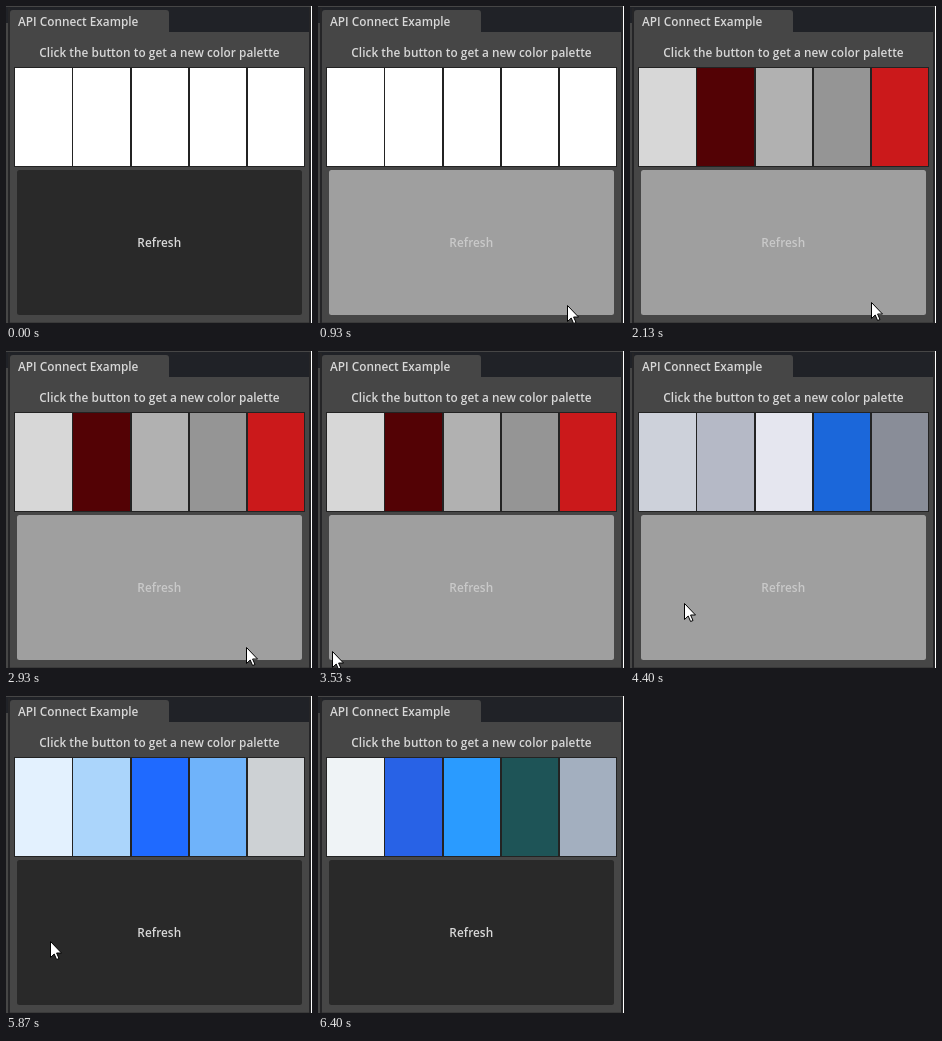
Write an HTML page that moves like this. It is 306 px wide and 317 px high and loops after 7140 ms.

```html
<!DOCTYPE html>
<html lang="en">
<head>
<meta charset="utf-8">
<title>API Connect Example</title>
<style>
  html, body { margin: 0; width: 100%; height: 100%; overflow: hidden; background: #464646; }
  svg { display: block; width: 306px; height: 317px; }
  text { font: 600 11.8px "Open Sans", "Noto Sans", sans-serif; fill: #d8d8d8; }
  .mid { text-anchor: middle; letter-spacing: .05px; }
</style>
</head>
<body>
<svg viewBox="0 0 306 317">
  <rect width="306" height="317" fill="#464646"/>
  <g shape-rendering="crispEdges">
    <rect x="2" y="1" width="302" height="25" fill="#202227"/>
    <rect y="1" width="2" height="16" fill="#202227"/>
    <rect x="2" y="2" width="2" height="315" fill="#252527"/>
    <rect x="303" y="1" width="2" height="316" fill="#252527"/>
    <rect x="305" width="1" height="317" fill="#fff"/>
    <rect x="4" y="316" width="299" height="1" fill="#3a3a3a"/>
  </g>
  <path d="M4 27V7q0-3 3-3H160q3 0 3 3V27z" fill="#464646"/>
  <text x="12" y="20">API Connect Example</text>
  <text x="153.5" y="51" class="mid">Click the button to get a new color palette</text>
  <rect x="8" y="61" width="291" height="100" fill="#232323"/>
  <g id="swatches" shape-rendering="crispEdges"></g>
  <rect id="button" x="11" y="164" width="285" height="145" rx="2.5"/>
  <text id="label" x="153.3" y="241" class="mid">Refresh</text>
  <path id="cursor" d="M.5.5V16.5L4.2 13 6.6 18.5 9 17.5 6.6 12H11.5z" fill="#fff" stroke="#000"/>
</svg>
<script>
const LOOP = 7140;
const $ = id => document.getElementById(id);

const palettes = [
  [0, '#fff #fff #fff #fff #fff'],
  [2070, '#d7d7d7 #530205 #b1b1b1 #959595 #cb191b'],
  [3800, '#cdd1da #b5b9c6 #e5e6ef #1b67da #898d98'],
  [5000, '#e3f1fe #abd5fb #1f6aff #6fb3fa #cdd1d4'],
  [6400, '#eff3f6 #2862e6 #2a9bff #1e5457 #a3afbf']
].map(([t, list]) => [t, list.split(' ')]);

const looks = {
  normal: ['#292929', '#d8d8d8'],
  hover: ['#9f9f9f', '#c9c9c9'],
  pressed: ['#292929', '#d8d8d8']
};

// time, button state, pointer x and y (no position: pointer is away)
const steps = [
  [0, 'normal'],
  [730, 'hover', 264, 304], [800, 'hover', 256, 297],
  [870, 'hover', 251, 298], [930, 'hover', 249, 299],
  [1530, 'pressed', 249, 299], [1600, 'hover', 249, 299],
  [2070, 'hover', 244, 297], [2130, 'hover', 241, 296],
  [2930, 'hover', 240, 296], [3000, 'pressed', 240, 296],
  [3200, 'hover', 236, 296], [3270, 'hover', 215, 295],
  [3330, 'hover', 172, 294], [3400, 'hover', 112, 295],
  [3470, 'hover', 54, 297], [3530, 'hover', 14, 300], [3600, 'normal'],
  [4270, 'hover', 16, 258], [4330, 'hover', 42, 253],
  [4400, 'hover', 54, 252], [4530, 'pressed', 54, 252],
  [4600, 'hover', 54, 252], [4670, 'hover', 42, 252],
  [4800, 'hover', 14, 254], [4870, 'normal'],
  [5600, 'hover', 12, 250], [5670, 'hover', 34, 246], [5730, 'hover', 44, 245],
  [5870, 'pressed', 44, 245], [5930, 'hover', 44, 245],
  [6070, 'hover', 20, 247], [6130, 'normal']
];

const swatches = Array.from({ length: 5 }, (_, i) => {
  const r = document.createElementNS('http://www.w3.org/2000/svg', 'rect');
  const x = Math.round(9 + 58.25 * i);
  const box = { x, y: 62, width: 66 + 58 * i - x, height: 98 };
  for (const k in box) r.setAttribute(k, box[k]);
  return $('swatches').appendChild(r);
});

const at = (table, t) => table.findLast(row => row[0] <= t);

function draw(t) {
  const [, colors] = at(palettes, t);
  swatches.forEach((r, i) => r.setAttribute('fill', colors[i]));
  const [, state, x, y] = at(steps, t);
  const [back, ink] = looks[state];
  $('button').setAttribute('fill', back);
  $('label').style.fill = ink;
  $('cursor').style.display = x === undefined ? 'none' : '';
  if (x !== undefined) $('cursor').setAttribute('transform', `translate(${x} ${y})`);
}

const start = performance.now();
function tick() {
  draw((performance.now() - start) % LOOP);
  requestAnimationFrame(tick);
}
tick();
</script>
</body>
</html>
```
